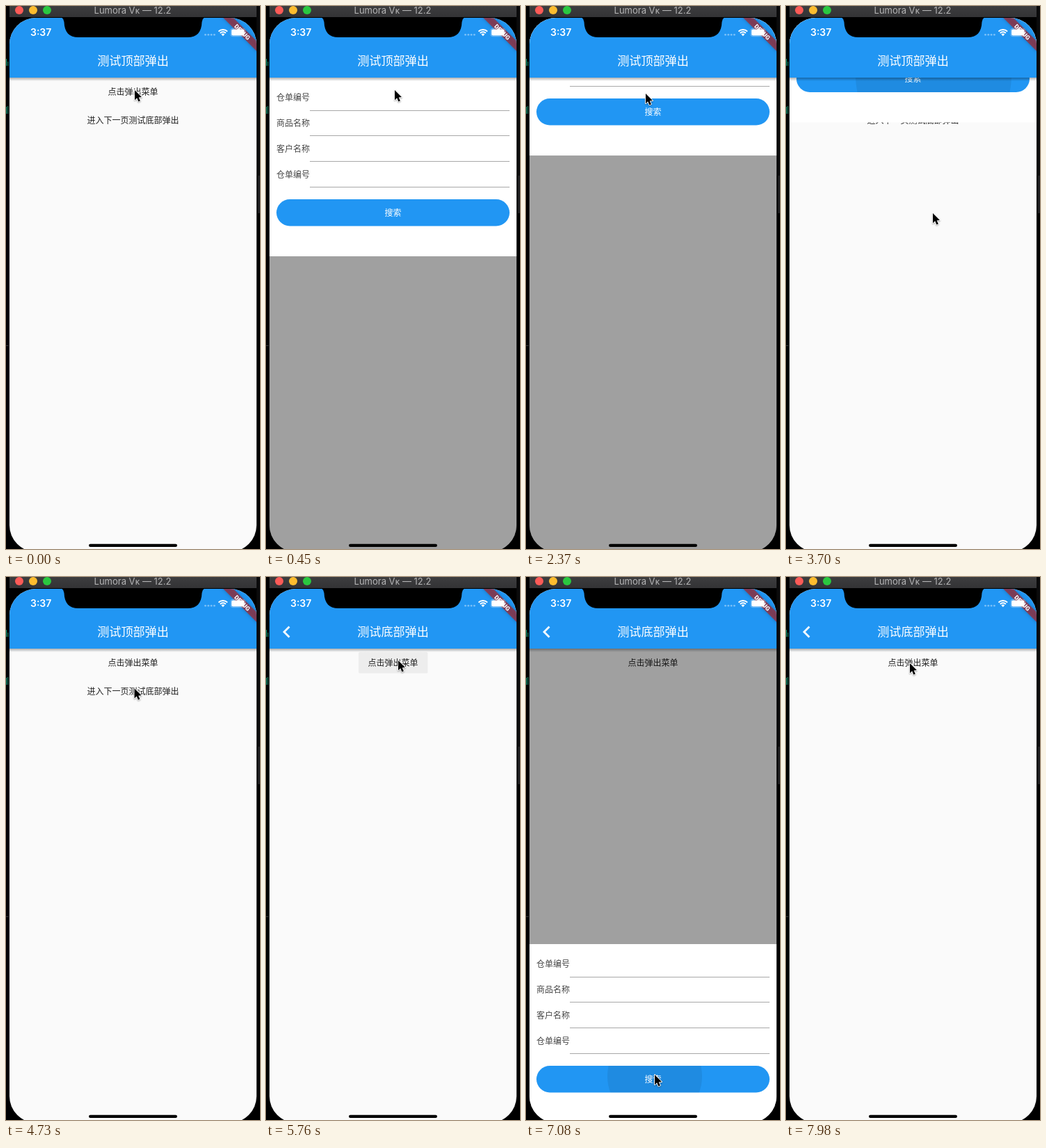
These frames come from a looping animation (365x781 px, 8000 ms). An HTML page with a canvas:

```html
<!DOCTYPE html>
<html lang="zh">
<head>
<meta charset="utf-8">
<title>Popup menu demo</title>
<style>
  html, body { margin: 0; width: 100%; height: 100%; overflow: hidden; background: #000; }
  canvas { display: block; width: 365px; height: 781px; }
</style>
</head>
<body>
<canvas id="stage"></canvas>
<script>
const W = 365, H = 781, LOOP = 8000, TICK = 147.7;
const SCREEN = { x: 5, y: 17, w: 355, h: 768, r: 38 };
const BAR_BOTTOM = 103, MID = 182.5, PANEL_H = 257;
const BLUE = '#2196f3', INK = '#222', PAPER = '#fafafa';
const CJK = '"Noto Sans CJK SC", "Noto Sans CJK", sans-serif';
const LATIN = 'Inter, "Noto Sans", "DejaVu Sans", sans-serif';

const canvas = document.getElementById('stage');
const ctx = canvas.getContext('2d');
const dpr = window.devicePixelRatio || 1;
canvas.width = W * dpr;
canvas.height = H * dpr;

const pointerKeys = [
  [0, 185, 121], [4, 185, 121], [7, 185, 292], [10, 185, 292],
  [13, 172, 126], [17, 172, 126], [20, 211, 298], [26, 211, 298],
  [30, 184, 160], [31, 184, 160], [34, 186, 161], [38, 190, 120],
  [42, 190, 120], [46, 185, 716], [50, 185, 716], [54, 178, 124]
];
const panelKeys = [
  [1, 0], [2, .6], [3, 1], [8, 1], [9, .426], [10, 0],
  [15, 0], [16, .436], [17, 1], [24, 1], [25, .251], [26, 0],
  [40, 0], [41, .5], [42, 1], [48, 1], [49, .4], [50, 0]
];
const dimSpans = [[2, 8], [16, 24], [41, 48]];
const pressSpans = [[1, 1, .05], [14, 14, .025], [15, 15, .05], [39, 39, .05], [40, 40, .065]];
const ripples = [
  { from: 8, to: 9, x: 185, r0: 40, grow: 46 },
  { from: 24, to: 25, x: 212, r0: 48, grow: 64 },
  { from: 47, to: 49, x: 185, r0: 30, grow: 38 }
];
const PUSH_TICK = 34, PUSH_OFFSET = 12;

const smooth = u => u * u * (3 - 2 * u);
const within = (spans, n) => spans.find(s => n >= s[0] && n <= s[1]);

function track(keys, n, ease = u => u) {
  if (n <= keys[0][0]) return keys[0].slice(1);
  for (let i = 1; i < keys.length; i++) {
    const a = keys[i - 1], b = keys[i];
    if (n <= b[0]) {
      const u = ease((n - a[0]) / (b[0] - a[0]));
      return a.slice(1).map((v, j) => v + (b[j + 1] - v) * u);
    }
  }
  return keys[keys.length - 1].slice(1);
}

function rect(x, y, w, h, fill) {
  ctx.fillStyle = fill;
  ctx.fillRect(x, y, w, h);
}

function roundPath(x, y, w, h, r) {
  ctx.beginPath();
  ctx.roundRect(x, y, w, h, r);
}

function disc(x, y, r, fill) {
  ctx.fillStyle = fill;
  ctx.beginPath();
  ctx.arc(x, y, r, 0, Math.PI * 2);
  ctx.fill();
}

function polyline(points) {
  ctx.beginPath();
  points.forEach(([x, y]) => ctx.lineTo(x, y));
}

function label(text, x, y, size, fill, { weight = 400, family = CJK, align = 'center' } = {}) {
  ctx.font = `${weight} ${size}px ${family}`;
  ctx.textAlign = align;
  ctx.fillStyle = fill;
  ctx.fillText(text, x, y + size * .37);
}

function drawDesktop() {
  rect(0, 0, W, H, '#000');
  rect(360, 0, 5, 244, '#0a0a0b');
  rect(362, 244, 3, 54, '#1d1d1f');
  rect(0, 488, 4, 1, '#333');
  rect(0, 76, 1, 10, '#0f9f78');
  rect(2, 80, 1.5, 6, '#0b6b52');
  rect(0, 145, 1, 10, '#0f9f78');
  rect(2, 144, 1.5, 11, '#0b6b52');

  const bar = ctx.createLinearGradient(0, 0, 0, 16);
  bar.addColorStop(0, '#3d3d3f');
  bar.addColorStop(1, '#333335');
  rect(5, 0, 355, 16, bar);
  ['#fc5b57', '#fdbc2e', '#2ac840'].forEach((c, i) => disc(19 + i * 20, 6, 6, c));
  label('Lumora Vᴋ — 12.2', 182, 6.5, 13, '#b5b5b6', { family: LATIN });
}

function drawAppBar(title, hasBack) {
  const shade = ctx.createLinearGradient(0, BAR_BOTTOM, 0, BAR_BOTTOM + 5);
  shade.addColorStop(0, 'rgba(0,0,0,.3)');
  shade.addColorStop(1, 'rgba(0,0,0,0)');
  rect(5, BAR_BOTTOM, 355, 5, shade);
  rect(5, 17, 355, BAR_BOTTOM - 17, BLUE);
  label(title, MID, 79, 17.14, '#fff', { weight: 500 });
  if (hasBack) {
    ctx.strokeStyle = '#fff';
    ctx.lineWidth = 2.8;
    polyline([[33.5, 71.5], [26, 79], [33.5, 86.5]]);
    ctx.stroke();
  }
}

function drawBody(page, press) {
  rect(5, 17, 355, 768, PAPER);
  if (press) {
    roundPath(133, 108, 99.5, 30.5, 1.7);
    ctx.fillStyle = `rgba(0,0,0,${press})`;
    ctx.fill();
  }
  label('点击弹出菜单', MID, 123.5, 12, INK);
  if (page === 1) label('进入下一页测试底部弹出', MID, 164.5, 12, INK);
}

function drawPanel(top, ripple, n) {
  rect(5, top, 355, PANEL_H, '#fff');
  ['仓单编号', '商品名称', '客户名称', '仓单编号'].forEach((name, i) => {
    const y = top + 29 + i * 36.75;
    label(name, 15, y, 12, '#444', { align: 'left' });
    rect(63, Math.round(y + 17.7), 287, 1, '#a8a8a8');
  });
  ctx.save();
  roundPath(15, top + 175, 335, 38.5, 19.25);
  ctx.fillStyle = BLUE;
  ctx.fill();
  if (ripple) {
    ctx.clip();
    disc(ripple.x, top + 190, ripple.r0 + (n - ripple.from) * ripple.grow, 'rgba(0,0,0,.075)');
  }
  ctx.restore();
  label('搜索', MID, top + 194.2, 12, '#fff', { weight: 500 });
}

function drawPage(page, n) {
  const [open] = track(panelKeys, n);
  const press = within(pressSpans, n);
  drawBody(page, press && press[2]);
  if (within(dimSpans, n)) rect(5, BAR_BOTTOM, 355, 682, 'rgba(0,0,0,.36)');
  if (open > 0) {
    const top = page === 1
      ? BAR_BOTTOM - PANEL_H * (1 - open)
      : 785 - PANEL_H * open;
    drawPanel(top, ripples.find(r => n >= r.from && n <= r.to), n);
  }
  drawAppBar(page === 1 ? '测试顶部弹出' : '测试底部弹出', page === 2);
}

function shifted(dx, draw) {
  ctx.save();
  ctx.translate(dx, 0);
  draw();
  ctx.restore();
}

function drawPush(n) {
  shifted((PUSH_OFFSET - SCREEN.w) / 3, () => drawPage(1, n));
  // Keep the strip left of the new page filled and softly shaded.
  const edge = SCREEN.x + PUSH_OFFSET;
  const shade = ctx.createLinearGradient(SCREEN.x, 0, edge, 0);
  shade.addColorStop(0, 'rgba(0,0,0,.02)');
  shade.addColorStop(1, 'rgba(0,0,0,.1)');
  rect(SCREEN.x, 17, PUSH_OFFSET, 768, shade);
  shifted(PUSH_OFFSET, () => drawPage(2, n));
}

function drawBanner() {
  ctx.save();
  ctx.translate(360, 17);
  ctx.rotate(Math.PI / 4);
  ctx.save();
  ctx.shadowColor = 'rgba(0,0,0,.4)';
  ctx.shadowBlur = 5 * dpr;
  rect(-36, 23.5, 72, 10.3, 'rgba(183,28,28,.63)');
  ctx.restore();
  label('DEBUG', 0, 28.7, 8.7, '#fff', { weight: 900, family: 'Roboto, sans-serif' });
  ctx.restore();
}

function drawStatus() {
  label('3:37', 35, 38.2, 14, '#fff', { weight: 600, family: LATIN, align: 'left' });
  for (let i = 0; i < 4; i++) disc(286.5 + i * 4.3, 41.3, 1.4, 'rgba(255,255,255,.4)');

  ctx.strokeStyle = '#fff';
  ctx.lineWidth = 2;
  [9, 5.7].forEach(r => {
    ctx.beginPath();
    ctx.arc(311.8, 43, r, -Math.PI * .75, -Math.PI * .25);
    ctx.stroke();
  });
  ctx.fillStyle = '#fff';
  ctx.beginPath();
  ctx.moveTo(311.8, 43.3);
  ctx.arc(311.8, 43.3, 3.5, -Math.PI * .75, -Math.PI * .25);
  ctx.fill();

  roundPath(324, 33.5, 18.5, 9, 2);
  ctx.fill();
  ctx.strokeStyle = 'rgba(255,255,255,.35)';
  ctx.lineWidth = 1;
  roundPath(322.8, 32.3, 20.9, 11.4, 3);
  ctx.stroke();
}

function drawNotch() {
  ctx.fillStyle = '#000';
  ctx.beginPath();
  ctx.moveTo(78, 16);
  ctx.quadraticCurveTo(83, 17, 83.5, 23);
  ctx.bezierCurveTo(84, 38, 91, 45, 104, 45);
  ctx.lineTo(261, 45);
  ctx.bezierCurveTo(274, 45, 281, 38, 281.5, 23);
  ctx.quadraticCurveTo(282, 17, 287, 16);
  ctx.fill();
}

function drawPointer(x, y) {
  ctx.save();
  ctx.translate(x, y);
  polyline([[0, 0], [0, 14.2], [3.2, 11.3], [5.4, 16.4], [7.9, 15.3], [5.7, 10.4], [10, 10.1]]);
  ctx.closePath();
  ctx.shadowColor = 'rgba(0,0,0,.35)';
  ctx.shadowBlur = 2 * dpr;
  ctx.shadowOffsetY = dpr;
  ctx.lineJoin = 'round';
  ctx.lineWidth = 1.8;
  ctx.strokeStyle = '#fff';
  ctx.stroke();
  ctx.shadowColor = 'transparent';
  ctx.fillStyle = '#000';
  ctx.fill();
  ctx.restore();
}

function render(ms) {
  const n = Math.min(54, Math.floor((ms % LOOP + 10) / TICK));
  ctx.setTransform(dpr, 0, 0, dpr, 0, 0);
  drawDesktop();

  ctx.save();
  roundPath(SCREEN.x, SCREEN.y, SCREEN.w, SCREEN.h, SCREEN.r);
  ctx.clip();
  if (n === PUSH_TICK) drawPush(n);
  else drawPage(n < PUSH_TICK ? 1 : 2, n);
  drawBanner();
  drawStatus();
  drawNotch();
  ctx.restore();

  roundPath(119, 773.8, 127, 4.3, 2.15);
  ctx.fillStyle = '#000';
  ctx.fill();
  drawPointer(...track(pointerKeys, n, smooth));
}

const start = performance.now();
function loop() {
  render(performance.now() - start);
  requestAnimationFrame(loop);
}
loop();
</script>
</body>
</html>
```
